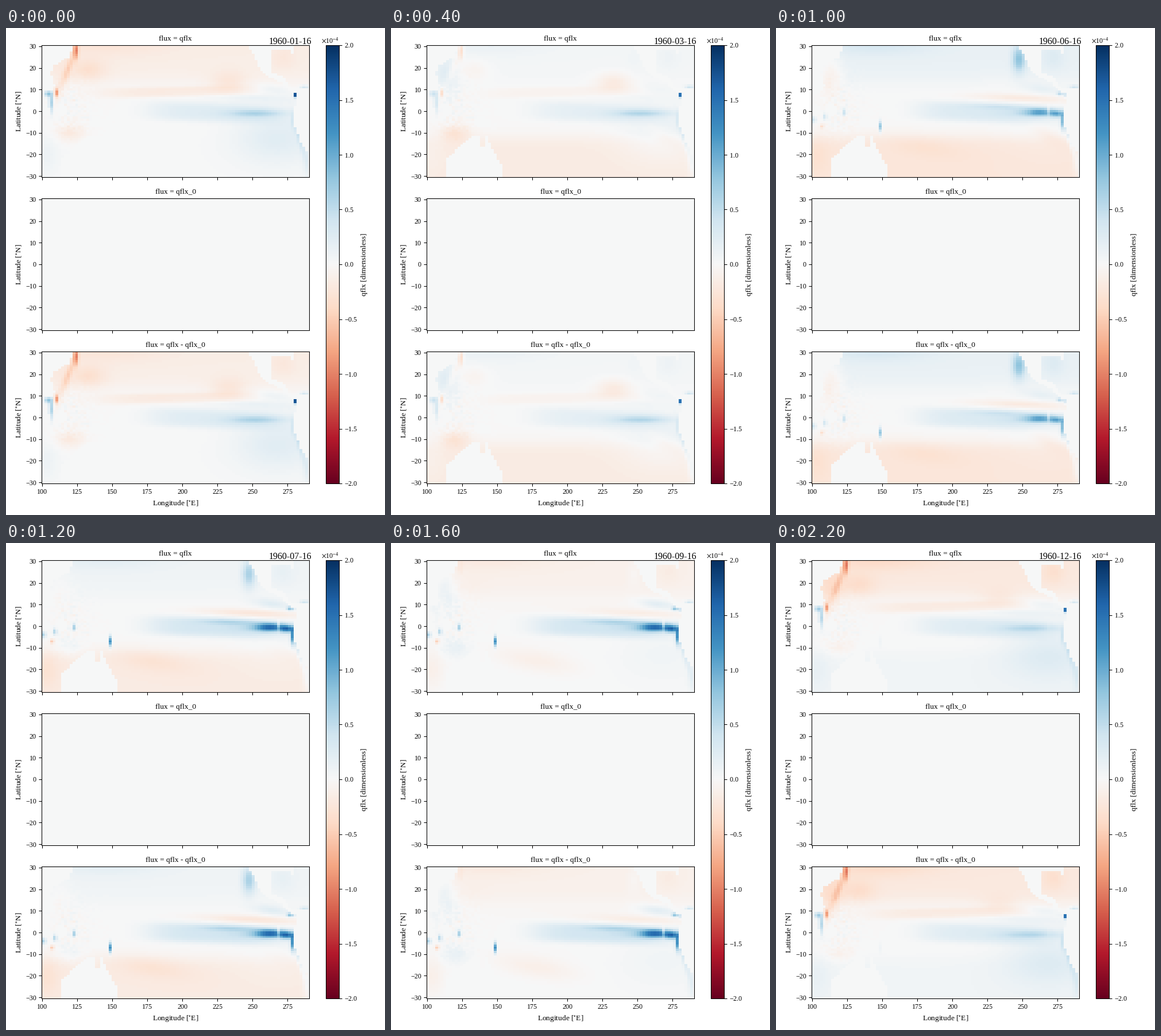
Write a matplotlib script that moves like this. It is 660x849 px and loops after 2.4 s.

```python
import numpy as np
import matplotlib.pyplot as plt
from matplotlib.animation import FuncAnimation
from matplotlib.ticker import MultipleLocator, ScalarFormatter

plt.rcParams.update({
    "font.family": "Liberation Serif", "mathtext.fontset": "stix",
    "font.size": 10, "axes.titlesize": 10, "axes.labelsize": 10,
    "xtick.labelsize": 9, "ytick.labelsize": 9,
})

W, H, DPI = 660, 849, 96
MONTHS = 12

lon_edges = 99.5 + 2 * np.arange(97)
lat_edges = -30.5 + np.arange(62)
LON, LAT = np.meshgrid(lon_edges[:-1] + 1, lat_edges[:-1] + 0.5)
month = np.arange(MONTHS)[:, None, None]


def wave(peak, period=12):
    return np.cos(2 * np.pi * (month - peak) / period)


def pulse(peak, sharp=2):
    """Once-a-year swell between 0 and 1."""
    return ((1 + wave(peak)) / 2) ** sharp


def bump(lon, lat, w, h, tilt=0.0, flat=False):
    u = ((LON - lon) / w) ** 2
    v = ((LAT - lat - tilt * (LON - lon)) / h) ** 2
    return np.exp(-u**2 - v**2) if flat else np.exp(-u - v)


def beyond(lat, width):
    """Smooth step poleward of a latitude; a negative width faces south."""
    return (1 + np.tanh((LAT - lat) / width)) / 2


def ellipse(lon, lat, w, h):
    return ((LON - lon) / w) ** 2 + ((LAT - lat) / h) ** 2 < 1


def coast(lats, lons):
    return np.interp(LAT, lats, lons)


def land_mask():
    asia = (LAT > 9.5) & (LON < coast([9.5, 12, 18, 21, 25, 30],
                                      [107, 109, 106, 108, 119, 122]))
    islands = (ellipse(114, 0.5, 3.5, 3.5) | ellipse(103, 0, 1.8, 3)
               | ellipse(140, -5.5, 6, 2.5))
    bay = (LAT > -16.5) & (abs(LON - 139) < 2)
    australia = ((LAT < -11) & ~bay
                 & (LON > coast([-22, -17, -11], [114, 122, 133]))
                 & (LON < coast([-25, -17, -11], [153, 146, 142])))
    mexico = ((LAT > 8.7)
              & (LON > coast([8.7, 13, 17, 20, 30], [277, 271, 259, 255, 247.5]))
              & (LON < coast([10.4, 10.6, 16, 18], [291, 277, 272, 263.5])))
    gulf_rim = (LAT > 28.5) & (abs(LON - 270.5) < 8.5)
    florida = (LAT > 26) & (abs(LON - 279) < 1)
    south = (LAT < 10.5) & (LON > coast([-19, -16, -6, 1, 6],
                                        [289.5, 285.5, 279.6, 280, 281.7]))
    return asia | islands | australia | mexico | gulf_rim | florida | south


warm = wave(4.2)
cool = pulse(7)
winter = pulse(11.8)
spring = pulse(1.2)


def open_ocean():
    north = (0.19 * warm - 0.03) * beyond(14, 5)
    rim = 0.2 * warm * bump(145, 31, 40, 5)
    south = -(0.08 + 0.18 * wave(4)) * beyond(-12, -3.5)
    southeast = (0.05 + 0.18 * winter) * bump(268, -12, 30, 12)
    trades = -0.16 * winter * bump(195, 9, 55, 2.4, 0.015, flat=True)
    patch = -0.22 * spring * bump(233, 13.5, 13, 4.5)
    drift = -0.15 * cool * bump(178, -16, 28, 5, -0.1)
    fan = -0.15 * pulse(3.5, 3) * bump(268, -11, 12, 4, -0.3)
    return north + rim + south + southeast + trades + patch + drift + fan


def cold_tongue():
    tail = ((0.14 + 0.25 * cool + 0.1 * winter)
            * bump(222, -0.5, 47, 4.5, -0.02, flat=True))
    ridge = 0.35 * cool * bump(235, 2, 22, 1.4, -0.02)
    axis = (0.12 + 0.3 * spring) * bump(253, -1, 21, 1.7)
    core = cool * (1.5 * bump(263, -0.5, 11, 1.9) + 1.3 * bump(275, -1.3, 5, 1.7))
    gap = -0.6 * cool * bump(268.5, 0, 1, 2)
    counter = (0.12 * winter - 0.24 * pulse(6.3)) * bump(250, 6, 36, 1.9, -0.03)
    return tail + ridge + axis + core + gap + counter


def american_coast():
    north = (0.25 * cool + 0.12 * winter) * bump(264, 10.3, 13, 2.2, -0.08)
    baja = 0.7 * pulse(5.2, 4) * bump(247.5, 24, 4.5, 6)
    panama = 2.1 * pulse(0.5, 1) * bump(280.5, 7.5, 1, 1.1)
    isthmus = 0.9 * cool * bump(277, 8.2, 2.4, 0.9)
    gulf = 0.14 * warm * bump(272, 25, 8, 6) + 0.4 * bump(287, 11.2, 3, 0.8)
    peru = ((0.15 + 1.2 * cool) * bump(279, -5, 1.6, 3.5)
            + 0.28 * bump(283, -11, 4, 4, -2) + 0.15 * bump(289, -24, 3, 7))
    return north + baja + panama + isthmus + gulf + peru


def asian_seas():
    china = 0.2 * wave(1.8, 6) * bump(113, 17, 8, 9)
    stream = -winter * (0.8 * bump(124, 28, 1.8, 4)
                        + 0.3 * bump(118, 19, 6, 4, 1.5)
                        + 0.2 * bump(133, 19, 12, 5)
                        + 0.9 * bump(110, 8.5, 1.3, 2))
    siam = 0.75 * winter * (bump(104, 8, 2.6, 1.4) + bump(106, 4, 1.3, 4.5))
    banda = (0.2 * wave(7.5) - 0.05) * bump(120, -10, 10, 4)
    indian = (0.1 * winter - 0.15 * cool) * bump(103, -20, 9, 9)
    straits = 0.8 * cool * sum(bump(x, y, 1.4, 1.4) for x, y in
                               ((101, -4), (109, -2.5), (122.5, -0.5)))
    spots = cool * (1.4 * bump(148.5, -7, 1, 2.3) - 0.6 * bump(107, -7, 1.5, 1))
    speckle = np.random.default_rng(4).normal(0, 0.05, LON.shape)
    return (china + stream + siam + banda + indian + straits + spots
            + speckle * bump(120, 2, 14, 13))


flux = open_ocean() + cold_tongue() + american_coast() + asian_seas()
flux[:, land_mask()] = 0
flux *= 1e-4

fig = plt.figure(figsize=(W / DPI, H / DPI), dpi=DPI, facecolor="white")


def add_axes(x, y, w, h):
    return fig.add_axes([x / W, 1 - (y + h) / H, w / W, h / H])


def panel(top, title):
    ax = add_axes(62, top, 466, 230)
    mesh = ax.pcolormesh(lon_edges, lat_edges, np.zeros(LON.shape),
                         cmap="RdBu", vmin=-2e-4, vmax=2e-4)
    ax.set(xlim=(99.5, 290.5), ylim=(-30.5, 30.5), title=title,
           ylabel=r"Latitude [$^{\circ}$N]")
    ax.xaxis.set_major_locator(MultipleLocator(25))
    ax.yaxis.set_major_locator(MultipleLocator(10))
    ax.tick_params(labelbottom=False)
    return ax, mesh


_, total = panel(30, "flux = qflx")
panel(297, "flux = qflx_0")
bottom, diff = panel(564, "flux = qflx - qflx_0")
bottom.tick_params(labelbottom=True)
bottom.set_xlabel(r"Longitude [$^{\circ}$E]")

fmt = ScalarFormatter(useMathText=True)
fmt.set_powerlimits((0, 0))
bar = fig.colorbar(total, cax=add_axes(557, 30, 23, 764), format=fmt,
                   ticks=MultipleLocator(0.5e-4))
bar.set_label("qflx [dimensionless]")

date = fig.text(532.5 / W, 1 - 27.5 / H, "", size=12, ha="right", va="baseline")


def update(i):
    for mesh in (total, diff):
        mesh.set_array(flux[i])
    date.set_text(f"1960-{i + 1:02d}-16")
    return total, diff, date


anim = FuncAnimation(fig, update, frames=MONTHS, interval=200,
                     repeat=True, repeat_delay=0, blit=False)
plt.show()
```
